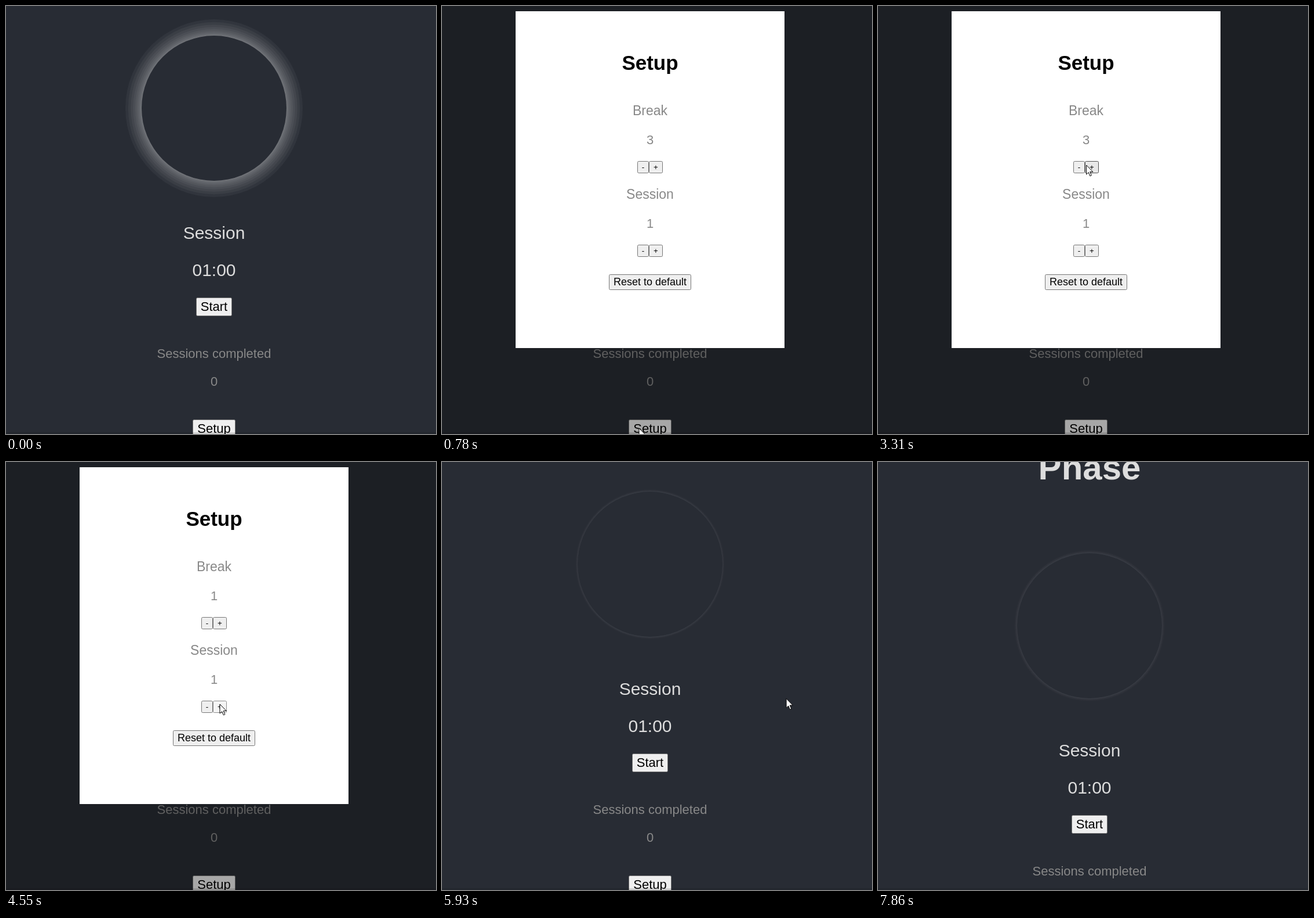
Recreate the animation shown at these times as an HTML page. Size 742 by 737 pixels, loop 8 s.

```html
<!DOCTYPE html>
<html lang="en">
<head>
<meta charset="utf-8">
<title>Session timer</title>
<style>
  html, body { margin: 0; width: 100%; height: 100%; overflow: hidden; background: #282c34; }
  svg { display: block; width: 742px; height: 737px; font-family: "Liberation Sans", Arial, sans-serif; }
  text { text-anchor: middle; }
  .light { fill: #ddd; }
  .dim { fill: #888; }
  .button rect { fill: #efefef; stroke: #767676; }
  .button.hover rect { fill: #e8e8e8; stroke: #4f4f4f; }
  .button.active rect { fill: #f5f5f5; stroke: #8d8d8d; }
</style>
</head>
<body>
<svg id="stage" viewBox="0 0 742 737"></svg>
<script>
const LOOP = 8000, PRESS = 120;
const MODAL_OPEN = 780, MODAL_CLOSE = 5930;
const CENTER = 359, RADIUS = 125, SPREAD = 28, LAYERS = 10;

const boxes = {};
const $ = id => document.getElementById(id);
const clamp = k => Math.min(1, Math.max(0, k));
const smooth = k => k * k * (3 - 2 * k);

const text = (str, y, size, attrs = "", x = CENTER) =>
  `<text x="${x}" y="${y}" font-size="${size}" ${attrs}>${str}</text>`;

function button(id, label, y, w, h, size, x = CENTER - w / 2) {
  boxes[id] = { x, y, w, h };
  return `<g id="${id}" class="button">
    <rect x="${x + .5}" y="${y + .5}" width="${w - 1}" height="${h - 1}" rx="2"/>
    ${text(label, Math.round(y + h / 2 + size * .33), size, "", x + w / 2)}</g>`;
}

const stepper = (name, label, y) =>
  text(label, y, 23, 'class="dim"') +
  text("", y + 50, 22, `class="dim" id="${name}Value"`) +
  button(name + "Minus", "-", y + 79, 20, 21, 13.33, 337) +
  button(name + "Plus", "+", y + 79, 24, 21, 13.33, 357);

$("stage").innerHTML = `
  <rect width="742" height="737" fill="#282c34"/>
  <g id="page">
    ${text("Phase", -76, 60, 'class="light" font-weight="bold"')}
    ${`<circle class="glow" cx="${CENTER}" cy="176" fill="#fff"/>`.repeat(LAYERS)}
    <circle cx="${CENTER}" cy="176" r="${RADIUS}" fill="#282c34"/>
    ${text("Session", 401, 30, 'class="light"')}
    ${text("01:00", 465, 30, 'class="light"')}
    ${button("start", "Start", 502, 62, 32, 22)}
    ${text("Sessions completed", 606, 22, 'class="dim"')}
    ${text("0", 654, 22, 'class="dim"')}
    ${button("setup", "Setup", 712, 74, 32, 22)}
  </g>
  <g id="modal">
    <rect width="742" height="737" opacity=".3"/>
    <rect x="127" y="9" width="464" height="580" fill="#fff"/>
    ${text("Setup", 110, 35, 'font-weight="bold"')}
    ${stepper("break", "Break", 188)}
    ${stepper("session", "Session", 332)}
    ${button("reset", "Reset to default", 462, 142, 27, 18)}
  </g>
  <rect y="734" width="742" height="3" opacity=".12"/>
  <path id="pointer" d="M0 0V16L3.7 12.6 6.3 18.8 8.8 17.7 6.2 11.6H11.3Z"
    fill="#fff" stroke="#000" stroke-linejoin="round"/>`;

const glows = [...document.querySelectorAll(".glow")];

// Start times of the presses; a value changes on release.
const presses = {
  setup: [660],
  breakMinus: [1910, 2500, 3490, 3780],
  breakPlus: [2900, 3120],
  sessionPlus: [4550],
  sessionMinus: [4960]
};

// Pointer moves between rests; off the stage it is out of sight.
const moves = [
  { from: 340, to: 480, x: 340, y: 727 },
  { from: 1020, to: 1790, x: 344, y: 273, lift: 370 },
  { from: 2620, to: 2680, x: 372, y: 274 },
  { from: 3240, to: 3390, x: 345, y: 274 },
  { from: 3950, to: 4430, x: 369, y: 417 },
  { from: 4760, to: 4900, x: 346, y: 418 },
  { from: 5390, to: 5810, x: 600, y: 400 },
  { from: 5902, to: 6220, x: 347, y: 715 },
  { from: 6220, to: 6280, x: 347, y: 745 },
  { from: 6500, to: 6820, x: 355, y: -25 }
];

function pointerAt(t) {
  let x = 338, y = 745;
  for (const m of moves) {
    const k = smooth(clamp((t - m.from) / (m.to - m.from)));
    const lift = m.lift || 0;
    x += (m.x - x) * k + lift * .1 * Math.sin(2 * Math.PI * k);
    y += (m.y - y) * k - lift * Math.sin(Math.PI * k);
  }
  return { x, y };
}

// Bright at the start, later a slow swell around its faintest moment.
const glowAt = t => t < MODAL_OPEN
  ? 1 - .12 * clamp((t - 300) / 180)
  : Math.min(1, .04 + 1.2e-7 * (t - 6800) ** 2);

function drawGlow(s) {
  glows.forEach((c, i) => {
    c.setAttribute("r", RADIUS + SPREAD * s * ((i + 1) / LAYERS) ** 1.8);
    c.setAttribute("opacity", .042 * s ** .7);
  });
}

const clicks = (id, t) => presses[id].filter(p => t >= p + PRESS).length;

function showValue(name, first, t) {
  $(name + "Value").textContent =
    first + clicks(name + "Plus", t) - clicks(name + "Minus", t);
}

function render(t) {
  const open = t >= MODAL_OPEN && t < MODAL_CLOSE;
  $("modal").style.display = open ? "" : "none";

  const pan = clamp((t - 7150) / 710) ** .89;
  $("page").setAttribute("transform",
    `translate(${Math.round(6 * pan)} ${Math.round(106 * pan)})`);
  drawGlow(glowAt(t));
  showValue("break", 3, t);
  showValue("session", 1, t);

  const tip = pointerAt(t);
  $("pointer").setAttribute("transform", `translate(${tip.x} ${tip.y})`);

  for (const id in boxes) {
    const { x, y, w, h } = boxes[id];
    const reachable = open === $("modal").contains($(id));
    const over = tip.x >= x && tip.x < x + w && tip.y >= y && tip.y < Math.min(737, y + h);
    const down = (presses[id] || []).some(p => t >= p && t < p + PRESS);
    $(id).classList.toggle("hover", reachable && over);
    $(id).classList.toggle("active", down);
  }
}

const begin = performance.now();
function tick() {
  render((performance.now() - begin) % LOOP);
  requestAnimationFrame(tick);
}
tick();
</script>
</body>
</html>
```
